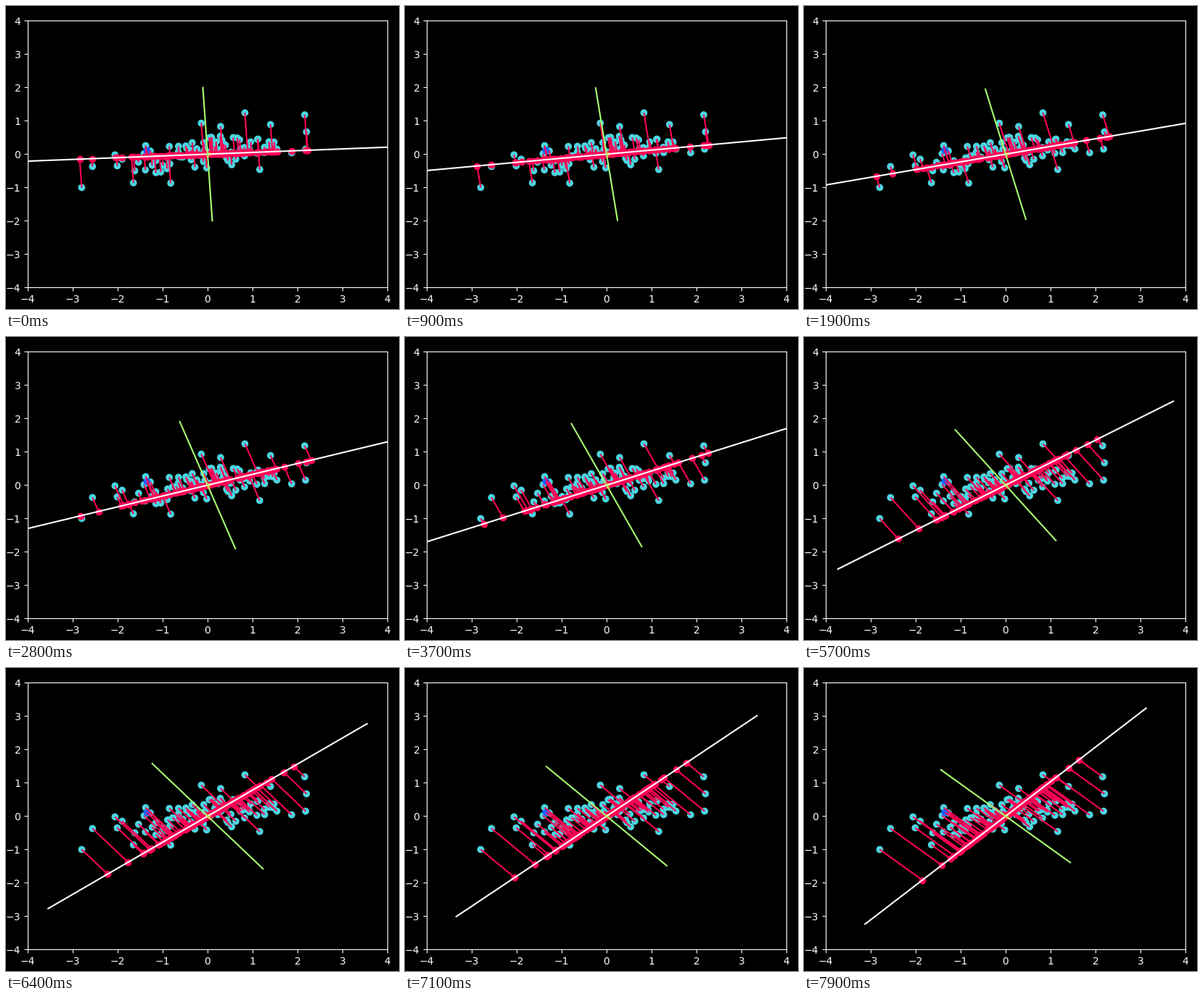
Animation of 542 by 418 pixels, one loop 8000 ms. Source, as a matplotlib script:

```python
import numpy as np
import matplotlib.pyplot as plt
from matplotlib.animation import FuncAnimation
from matplotlib.collections import LineCollection

W, H, DPI = 542, 418, 100
TICK = 100            # ms
FRAMES = 80
STEP_TICKS = 1.82     # ticks between two steps of one degree
FIRST_ANGLE = 3       # degrees

CYAN, PINK, BLUE = "#4ad6e0", "#ff0055", "#1464ff"
LIME, PURPLE, ORANGE = "#a8ff70", "#c800ff", "#ff6a00"

# A few outliers frame a loose, slightly tilted cloud.
outliers = np.array([
    (-2.80, -1.00), (-2.56, -.37), (-2.06, -.02), (-2.01, -.35),
    (-1.90, -.15), (-1.65, -.86), (-.82, -.87), (-.14, .93),
    (.29, .83), (.83, 1.24), (1.16, -.46), (1.40, .89),
    (1.87, .04), (2.16, 1.18), (2.20, .67), (2.18, .15),
])
CLOUD = 80
rng = np.random.default_rng(4)
# Evenly ranked x values, denser towards the centre.
rank = np.linspace(-1, 1, CLOUD)
cloud_x = 1.0 * rank + .6 * rank ** 3 + rng.normal(0, .03, CLOUD)
cloud_y = .04 + .17 * cloud_x + np.clip(rng.normal(0, .27, CLOUD), -.45, .45)
cloud = np.column_stack([cloud_x, cloud_y])

purple_point, blue_point = (-.25, .12), (-1.35, .11)
points = np.vstack([purple_point, outliers, cloud, blue_point])
colors = [PURPLE] + [CYAN] * (len(points) - 2) + [BLUE]

plt.style.use("dark_background")
fig = plt.figure(figsize=(W / DPI, H / DPI), dpi=DPI, facecolor="black")
ax = fig.add_axes([30 / W, 29.58 / H, 496 / W, 368.06 / H])
ax.set(xlim=(-4, 4), ylim=(-4, 4), xticks=range(-4, 5), yticks=range(-4, 5))

ax.scatter(*points.T, c=colors, zorder=1)
feet = ax.scatter(*points.T, color=PINK, zorder=1.1)
links = LineCollection([], colors=PINK, linewidths=1.5, zorder=2)
ax.add_collection(links)
ax.scatter(.02, 0, s=14, color=ORANGE, zorder=2.1)
main_axis, = ax.plot([], [], color="white", zorder=3)
cross_axis, = ax.plot([], [], color=LIME, zorder=3)


def set_segment(line, direction, reach):
    x, y = reach * direction
    line.set_data([-x, x], [-y, y])


def draw(frame):
    angle = np.radians(FIRST_ANGLE + int(frame / STEP_TICKS))
    along = np.array([np.cos(angle), np.sin(angle)])
    across = np.array([-along[1], along[0]])
    projected = np.outer(points @ along, along)
    feet.set_offsets(projected)
    links.set_segments(np.stack([points, projected], axis=1))
    set_segment(main_axis, along, 4.5)
    set_segment(cross_axis, across, 2)
    return feet, links, main_axis, cross_axis


anim = FuncAnimation(fig, draw, frames=FRAMES, interval=TICK,
                     repeat=True, repeat_delay=0, blit=False)
plt.show()
```
